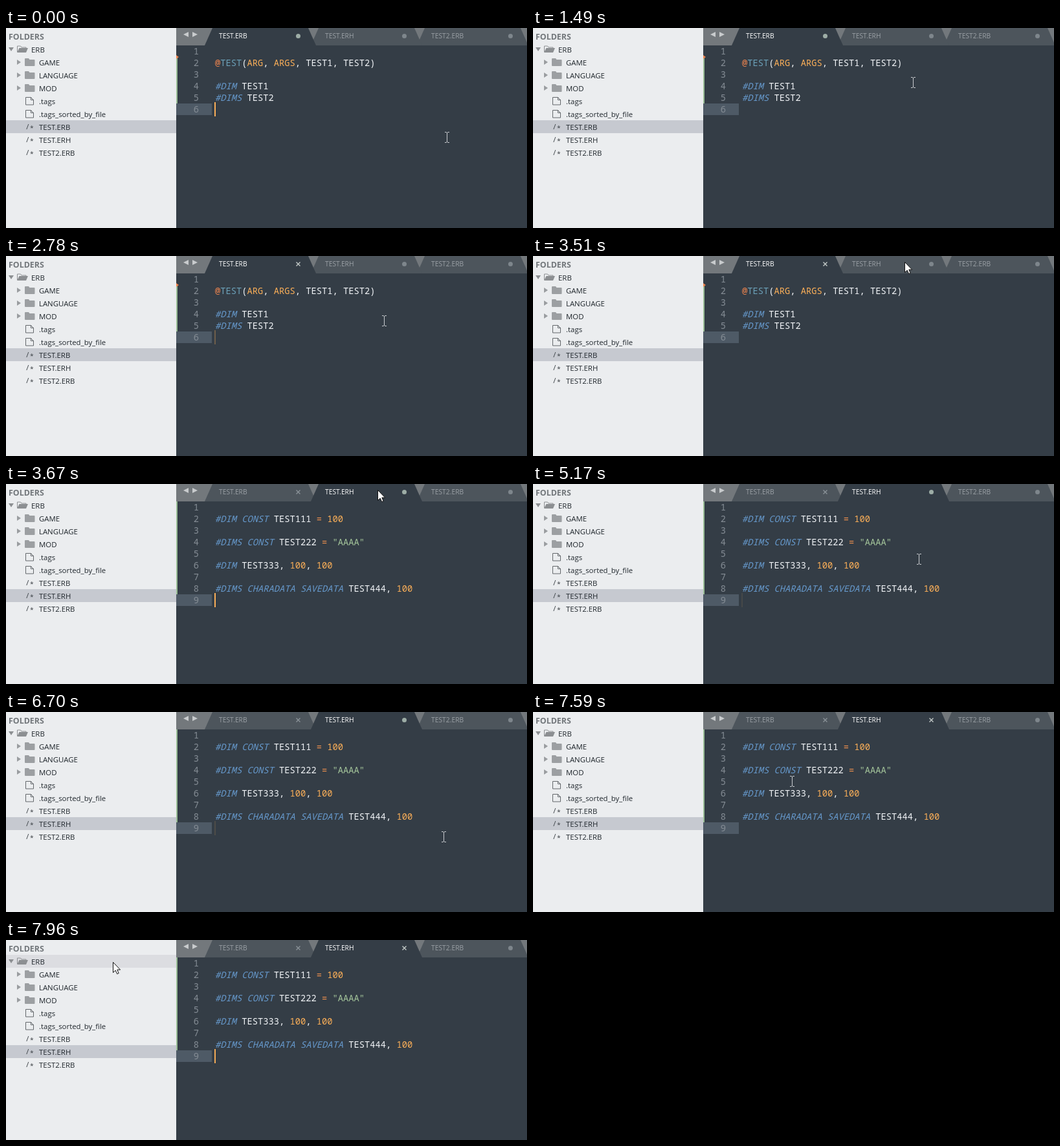
Recreate the animation shown at these times as an HTML page. Size 805 px wide and 310 px high, loop 8 s.

```html
<!DOCTYPE html>
<html lang="en">
<head>
<meta charset="utf-8">
<title>Code editor</title>
<style>
  html, body { margin: 0; width: 100%; height: 100%; overflow: hidden; background: #343d46; }
  svg { display: block; position: absolute; left: 0; top: 0; }
  text { white-space: pre; }
  .side { font: 11.4px "Open Sans", "Noto Sans", sans-serif; fill: #1f262c; }
  .head { font: bold 12.4px "Open Sans", "Noto Sans", sans-serif; fill: #72777b; }
  .tab { font: 10.3px "Open Sans", "Noto Sans", sans-serif; }
  .code { font: 13.75px "Noto Sans Mono", "DejaVu Sans Mono", monospace; fill: #f0f3f6; }
  .mark { font: 11px "Noto Sans Mono", monospace; fill: #3f4449; }
  .key { fill: #6699cc; font-style: italic; }
  .num { fill: #f9ae58; }
  .at { fill: #f0854f; }
  .fn { fill: #6ba0b8; }
  .op { fill: #f9944f; }
  .str { fill: #a3c49a; }
</style>
</head>
<body>
<svg width="805" height="310" viewBox="0 0 805 310">
  <g id="scene"></g>
  <rect id="caret" x="322" width="2" height="22" fill="#f9ae58"/>
  <path id="beam" d="M-3-7.5H-1L.5-6.5 2-7.5H4M.5-6.5V7.5M-3 8.5H-1L.5 7.5 2 8.5H4" fill="none" stroke="#c9ccd0"/>
  <path id="arrow" d="M.5 .5V16.5L4.2 13.1 6.7 18.6 9.2 17.5 6.8 12.1H11.6Z" fill="#fff" stroke="#111"/>
</svg>
<script>
const LOOP = 8000, SWITCH = 3590, SAVE_ERB = 2780, SAVE_ERH = 6820;
const $ = id => document.getElementById(id);

const entries = ['ERB', 'GAME', 'LANGUAGE', 'MOD', '.tags', '.tags_sorted_by_file',
  'TEST.ERB', 'TEST.ERH', 'TEST2.ERB'];
const tabs = ['TEST.ERB', 'TEST.ERH', 'TEST2.ERB'];

// Each token is "class:text"; rows without text stay empty.
const files = [
  { last: 6, from: 45, rows: {
    2: ['at:@', 'fn:TEST', ':(', 'num:ARG', ':, ', 'num:ARGS', ':, TEST1, TEST2)'],
    4: ['key:#DIM', ': TEST1'],
    5: ['key:#DIMS', ': TEST2'] } },
  { last: 9, from: 27, rows: {
    2: ['key:#DIM CONST', ': TEST111', 'op: = ', 'num:100'],
    4: ['key:#DIMS CONST', ': TEST222', 'op: = ', 'str:"AAAA"'],
    6: ['key:#DIM', ': TEST333, ', 'num:100', ':, ', 'num:100'],
    8: ['key:#DIMS CHARADATA SAVEDATA', ': TEST444, ', 'num:100'] } }
];

const rect = (x, y, w, h, fill) => `<rect x="${x}" y="${y}" width="${w}" height="${h}" fill="${fill}"/>`;
const path = (d, fill, more = '') => `<path d="${d}" fill="${fill}" ${more}/>`;
const text = (x, y, cls, s, more = '') => `<text x="${x}" y="${y}" class="${cls}" ${more}>${s}</text>`;

function icon(i, y) {
  if (i === 0) return path(`M4 ${y - 3}h8l-4 6z`, '#8c8f92') +
    path(`M17.5 ${y + 4}v-9h5l1.5 2h7v2`, 'none', 'stroke="#8c8f92"') +
    path(`M17 ${y + 5}l3.500-7h13.500l-3 7z`, '#8c8f92');
  if (i < 4) return path(`M17 ${y - 4}v8l6-4z`, '#9a9da0') +
    path(`M29 ${y + 5}v-10q0-1 1-1h5l1.5 2h7q1 0 1 1v8q0 1-1 1h-13.5q-1 0-1-1z`, '#9c9fa2');
  if (i < 6) return path(`M30.5 ${y - 5.5}h8l4 4v7.5h-12zM38.5 ${y - 5.5}v4h4`, 'none', 'stroke="#63676b"');
  return text(30, y + 4, 'mark', '/<tspan dy="2">*</tspan>');
}

function sidebar(active, hover) {
  let out = rect(0, 0, 263, 310, '#ebedef') + text(4, 17.5, 'head', 'FOLDERS');
  entries.forEach((name, i) => {
    const top = 23 + 20 * i;
    if (i === active + 6) out += rect(0, top, 263, 20, '#c6c9d0');
    else if (i === hover) out += rect(0, top, 263, 20, '#dcdde1');
    out += icon(i, top + 10) + text(i ? 51 : 39, top + 15, 'side', name);
  });
  return out;
}

function tab(i, on, saved) {
  const x = 307 + 164 * i, cx = x + 144.5;
  const tint = on ? '#c3cac8' : '#8a9298';
  return path(`M${x} 27L${x + 12} 0H${x + 160}L${x + 172} 27z`, on ? '#343d46' : '#4d555c') +
    text(x + 22, 16, 'tab', tabs[i], `fill="${on ? '#fff' : '#9ba1a6'}"`) +
    (saved ? path(`M${cx - 3} 9.5l6 6m0-6l-6 6`, 'none', `stroke="${tint}" stroke-width="1.4"`)
      : `<circle cx="${cx}" cy="12.5" r="3.5" fill="${on ? '#9dada6' : '#7e868c'}"/>`);
}

function editor({ last, from, rows }) {
  const top = 9 + 18 * last;
  let out = rect(263, 27, 542, 283, '#343d46') + rect(263, top, 55, 18, '#4e5a66') +
    rect(263, from, 2, top - from, '#99bd95');
  if (from > 27) out += path('M263 42l4 3-4 3z', '#f0854f');
  for (let n = 1; n <= last; n++) {
    const y = 23 + 18 * n;
    out += text(298, y, 'code', n, 'text-anchor="end" style="fill:#858d95"');
    const line = (rows[n] || []).map(s => {
      const k = s.indexOf(':');
      return `<tspan class="${s.slice(0, k)}">${s.slice(k + 1)}</tspan>`;
    }).join('');
    if (line) out += text(323, y, 'code', line);
  }
  return out;
}

function scene(active, saved, hover) {
  const order = [2, 1, 0].filter(i => i !== active).concat(active);
  return editor(files[active]) + rect(263, 0, 542, 27, '#73787c') +
    path('M282 6v8l-8-4zM288 6v8l8-4z', '#c8cbcd') +
    order.map(i => tab(i, i === active, saved[i])).join('') + sidebar(active, hover);
}

// Pointer stops: time, x, y
const stops = [[400, 681, 169], [1000, 597, 64], [1210, 590, 68], [1490, 587, 84], [1980, 584, 100],
  [2780, 584, 100], [3510, 574, 9], [3960, 574, 9], [4520, 521, 66], [4690, 521, 67],
  [4770, 521, 67], [5170, 596, 116], [5330, 595, 126], [5490, 595, 126], [5940, 676, 193],
  [7180, 676, 193], [7960, 165, 34]];

const clamp = v => Math.max(0, Math.min(1, v));

function pointer(t) {
  const k = stops.findIndex(s => s[0] > t);
  if (k < 1) return (k ? stops[stops.length - 1] : stops[0]).slice(1);
  const [a, b] = [stops[k - 1], stops[k]];
  const u = (t - a[0]) / (b[0] - a[0]), e = u * u * (3 - 2 * u);
  return [1, 2].map(j => Math.round(a[j] + (b[j] - a[j]) * e));
}

function caretAlpha(t) {
  if (t >= SWITCH && t < 3960) return 1;
  const u = (t < SWITCH ? t : t - 3960) % 1060;
  return u < 590 ? 1 - clamp((u - 60) / 100) : clamp((u - 590) / 240);
}

let shown = '';
function frame(now) {
  const t = now % LOOP, [x, y] = pointer(t);
  const active = t < SWITCH ? 0 : 1;
  const saved = [t >= SAVE_ERB, t >= SAVE_ERH, false];
  const hover = x < 263 ? Math.floor((y - 23) / 20) : -1;
  const key = [active, saved, hover].join();
  if (key !== shown) {
    $('scene').innerHTML = scene(active, saved, hover);
    shown = key;
  }
  $('caret').setAttribute('y', 7 + 18 * files[active].last);
  $('caret').setAttribute('opacity', caretAlpha(t));
  const isArrow = x < 318 || y < 27;
  for (const id of ['beam', 'arrow']) {
    $(id).setAttribute('transform', `translate(${x} ${y})`);
    $(id).style.display = (id === 'arrow') === isArrow ? '' : 'none';
  }
}

const start = performance.now();
function tick() {
  frame(performance.now() - start);
  requestAnimationFrame(tick);
}
tick();
</script>
</body>
</html>
```
